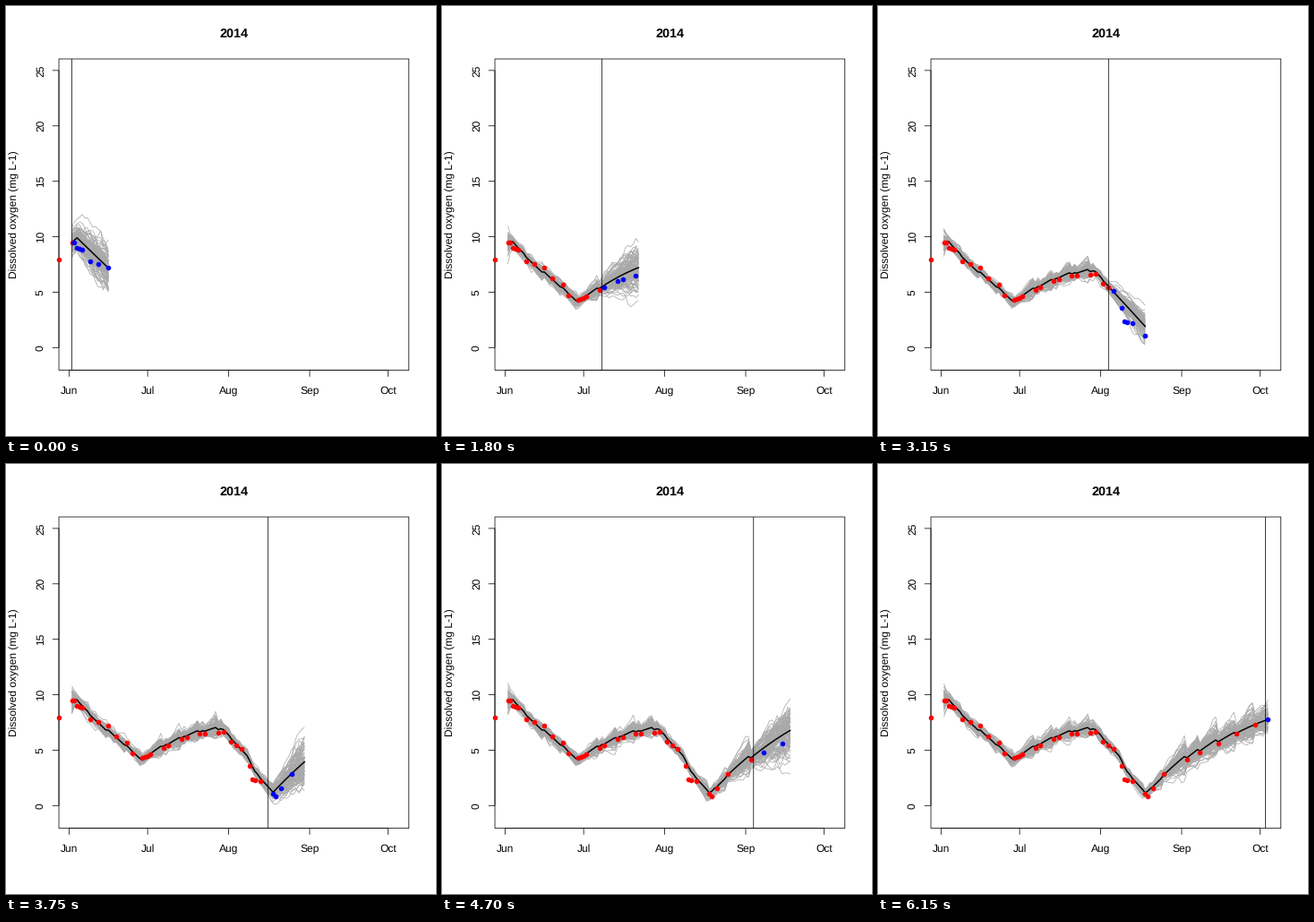
Recreate the animation shown at these times as a matplotlib script. Size 480 px wide and 480 px high, loop 6200 ms.

```python
import numpy as np
import matplotlib.pyplot as plt
from matplotlib.animation import FuncAnimation
from matplotlib.collections import LineCollection
from matplotlib.patches import Rectangle

PX = 0.9                      # points per pixel at 80 dpi
FRAMES, STEP = 124, 50
HORIZON, LAST_DAY, MEMBERS = 14, 125, 100
LEFT, RIGHT, TOP, BOTTOM = 59.04, 449.76, 59.04, 406.56
THIN, THICK = 0.75 * PX, 1.5 * PX

plt.rcParams.update({"font.family": "Liberation Sans", "text.hinting": "none"})


def axis_map(lo, hi, start, end):
    """Linear map of [lo, hi] into [start, end] with a 4 % margin."""
    pad = (end - start) * 0.04 / 1.08
    scale = (end - start - 2 * pad) / (hi - lo)
    return lambda v: start + pad + scale * (np.asarray(v, float) - lo)


sx = axis_map(1, LAST_DAY, LEFT, RIGHT)      # days since 1 June
sy = axis_map(-1, 25, BOTTOM, TOP)           # mg/L

# Sampling: daily bursts, half-weekly, weekly, and a few extra visits
obs_days = np.array(sorted({
    *range(1, 6), *(int(8 + 3.5 * k) for k in range(5)), *range(28, 32),
    *range(36, 86, 7), *range(38, 74, 7), *range(99, 121, 7),
    -4, 24, 62, 69, 70, 79, 81, 94, 125}))
obs_curve = [
    (-4, 7.96), (1, 9.5), (2, 9.5), (3, 9.0), (5, 8.85), (8, 7.8), (15, 7.25),
    (18, 6.25), (22, 5.7), (24, 4.75), (28, 4.28), (45, 6.2), (50, 6.46),
    (59, 6.64), (62, 5.8), (66, 5.1), (69, 3.55), (70, 2.33), (73, 2.17),
    (79, 0.87), (85, 2.87), (94, 4.17), (120, 7.32), (125, 7.76)]
obs_values = np.interp(obs_days, *zip(*obs_curve))
measured = dict(zip(obs_days.tolist(), obs_values))

# Daily change of the free-running model: first day, last day, rate at each
PHASES = [(1, 3, 0.2, 0.2), (3, 28, -0.23, -0.22), (28, 59, 0.19, 0.06),
          (59, 78, -0.25, -0.26), (78, 125, 0.25, 0.08)]


def rate(day):
    for first, last, r0, r1 in PHASES:
        if day < last:
            break
    return r0 + (r1 - r0) * (day - first) / (last - first)


def run_filter(now, n):
    """Mean and spread: drift daily, correct at each measurement up to now."""
    mean, spread = [9.5], [0.5]
    for day in range(2, n + 1):
        r = rate(day - 0.5)
        m = mean[-1] + r
        s = spread[-1] + (0.06 if r > 0 else 0.035)
        if day <= now and day in measured:
            m += s * s / (s * s + 0.25) * (measured[day] - m)
            s = max(0.2, 0.5 * s)
        mean.append(m)
        spread.append(s)
    return np.array(mean), np.array(spread)


def drift(rng, rows, n, rho=0.94):
    """Unit-variance autocorrelated noise."""
    z = rng.standard_normal((rows, n))
    for i in range(1, n):
        z[:, i] = rho * z[:, i - 1] + np.sqrt(1 - rho * rho) * z[:, i]
    return z


def simulate(now):
    rng = np.random.default_rng(2014 + now)
    n = min(now + HORIZON, LAST_DAY)
    mean, spread = run_filter(now, n)
    members = mean + spread * drift(rng, MEMBERS, n)
    return np.arange(1, n + 1), mean, np.maximum(members, 0.05)


fig = plt.figure(figsize=(6, 6), dpi=80, facecolor="white")
ax = fig.add_axes([0, 0, 1, 1])
ax.set(xlim=(0, 480), ylim=(480, 0))
ax.axis("off")


def segment(xs, ys, z=1):
    return ax.plot(xs, ys, color="black", lw=THIN, snap=False, zorder=z,
                   solid_capstyle="butt")[0]


def label(x, y, text, size=12, rotation=0, weight="normal"):
    ax.text(x, y, text, size=size * PX, rotation=rotation, weight=weight,
            ha="center", va="baseline", rotation_mode="anchor")


ax.add_patch(Rectangle((LEFT, TOP), RIGHT - LEFT, BOTTOM - TOP, fill=False,
                       ec="black", lw=THIN, snap=False, zorder=1))
segment(sx([0, 122]), [BOTTOM, BOTTOM])
segment([LEFT, LEFT], sy([0, 25]))
for day, month in zip((0, 30, 61, 92, 122), ("Jun", "Jul", "Aug", "Sep", "Oct")):
    x = sx(day)
    segment([x, x], [BOTTOM, BOTTOM + 7.2])
    label(x, 432.5, month)
for value in range(0, 26, 5):
    y = sy(value)
    segment([LEFT - 7.2, LEFT], [y, y])
    label(41.8, y, str(value), rotation=90)
label(254.4, 35, "2014", size=14.4, weight="bold")
label(13, 232.8, "Dissolved oxygen (mg L-1)", rotation=90)

cloud = LineCollection([], colors="darkgrey", linewidths=THIN, zorder=2)
ax.add_collection(cloud)
mean_line, = ax.plot([], [], color="black", lw=THICK, zorder=3)


def dots(color, z):
    return ax.plot([], [], "o", color=color, ms=5.6 * PX, mew=0, zorder=z,
                   snap=False)[0]


past, future = dots("#ff0000", 4), dots("#0000ff", 5)
now_line = segment([], [], z=6)


def update(frame):
    now = frame + 1
    days, mean, members = simulate(now)
    x = sx(days)
    cloud.set_segments([np.column_stack((x, sy(m))) for m in members])
    mean_line.set_data(x, sy(mean))
    used = obs_days <= now
    ahead = ~used & (obs_days <= now + HORIZON)
    for line, mask in ((past, used), (future, ahead)):
        line.set_data(sx(obs_days[mask]), sy(obs_values[mask]))
    now_line.set_data([sx(now)] * 2, [TOP, BOTTOM])
    return cloud, mean_line, past, future, now_line


anim = FuncAnimation(fig, update, frames=FRAMES, interval=STEP, repeat=True,
                     repeat_delay=0, blit=False)
plt.show()
```
